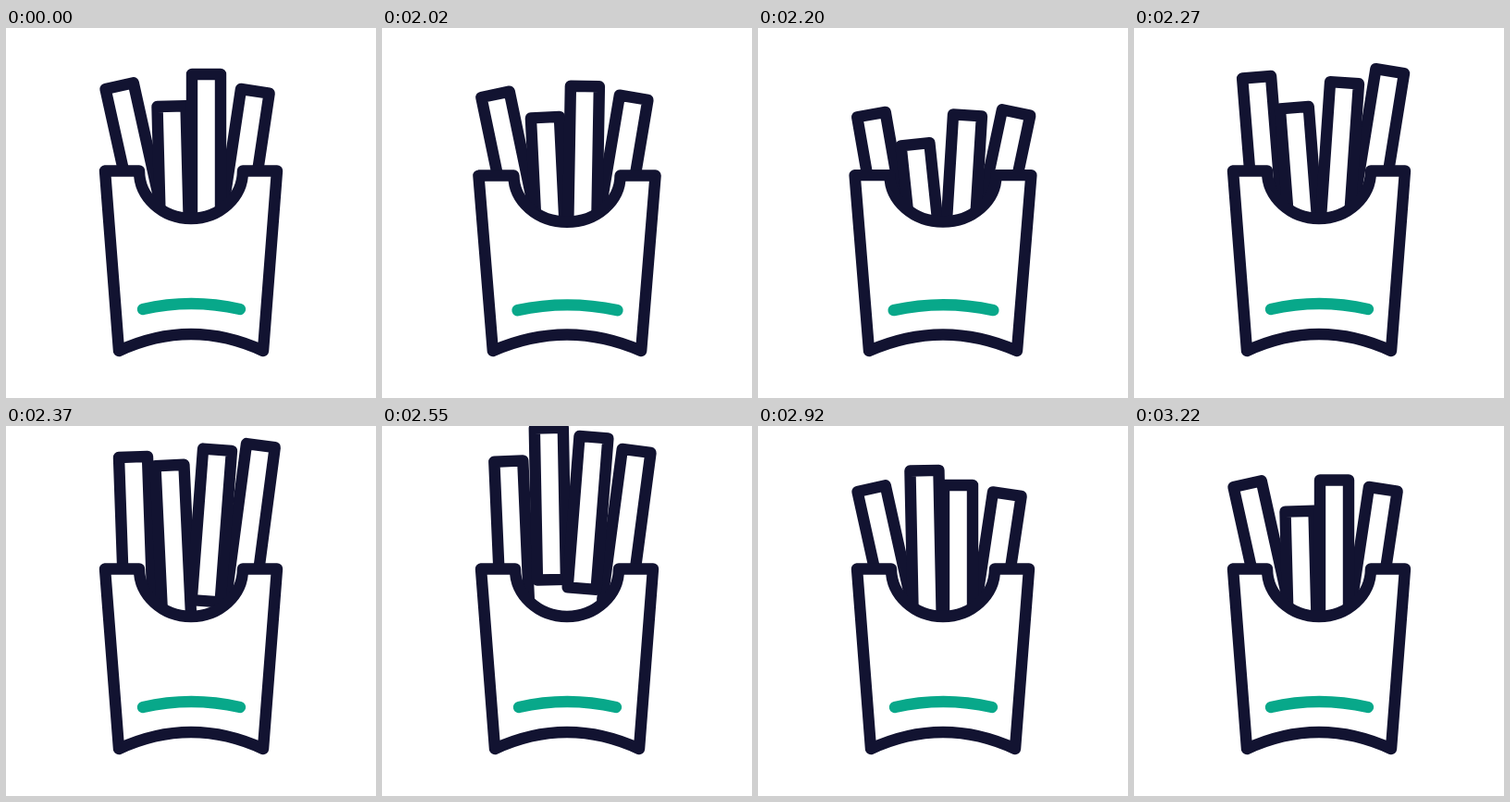
Write an HTML page that moves like this. It is 400 px wide and 400 px high and loops after 3250 ms.

```html
<!DOCTYPE html>
<html lang="en">
<head>
<meta charset="utf-8">
<title>French fries</title>
<style>
  html, body { margin: 0; height: 100%; overflow: hidden; background: #fff; }
  svg { display: block; width: 100%; height: 100%; }
  path, rect { fill: #fff; stroke: #121331; stroke-width: 12.4; stroke-linecap: round; stroke-linejoin: round; vector-effect: non-scaling-stroke; }
  .smile { fill: none; stroke: #08a88a; }
</style>
</head>
<body>
<svg viewBox="0 0 400 400">
  <g id="fries"></g>
  <g id="carton">
    <path d="M107 154.500H144A56 51.500 0 0 0 256 154.500H293L278 349Q200 313 122 349Z"/>
    <path class="smile" d="M148 304Q200 292 253 304"/>
  </g>
</svg>
<script>
const LOOP = 3250, START = 2020, LAUNCH = 2200, FALL = 400, BOUNCE = 300;

// Poses are the top left corner and the tilt in degrees.
// Each fry dips to low, flies to high at the time peak and drops back to rest, ending sag lower.
const fries = [
  { rest: [107.5, 66, -12.5], low: [107, 97, -10], high: [122, 34, -2], peak: 2365, sag: 0 },
  { rest: [254, 66, 8.5], low: [264, 89, 12], high: [260, 19, 7.5], peak: 2377, sag: 0 },
  { rest: [163.5, 85, -1.5], low: [154.5, 128, -6], high: [165, 0, -1], peak: 2608, sag: 4.5 },
  { rest: [201, 50, 0], low: [211, 94, 3.5], high: [213.5, 10.5, 4.5], peak: 2490, sag: 8.5 },
];

for (const fry of fries) {
  fry.node = document.createElementNS("http://www.w3.org/2000/svg", "rect");
  fry.node.setAttribute("width", 31);
  fry.node.setAttribute("height", 164);
  document.getElementById("fries").append(fry.node);
}

const mix = (a, b, k) => a + (b - a) * k;
const mixPose = (a, b, side, height = side) =>
  [mix(a[0], b[0], side), mix(a[1], b[1], height), mix(a[2], b[2], side)];

function pose({ rest, low, high, peak, sag }, t) {
  if (t < START) return rest;
  if (t < LAUNCH) return mixPose(rest, low, Math.sin(Math.PI / 2 * (t - 1980) / 220));
  if (t < peak) return mixPose(high, low, ((peak - t) / (peak - LAUNCH)) ** 2);

  const fall = Math.min((t - peak) / FALL, 1);
  const settle = Math.min(Math.max((t - peak - FALL) / BOUNCE, 0), 1);
  const landing = [rest[0], rest[1] + sag, rest[2]];
  const [x, y, tilt] = mixPose(high, landing, fall ** 4, fall ** 2.5);
  return [x, y + 6.5 * Math.sin(Math.PI * Math.sqrt(settle)), tilt];
}

function squash(t) {
  const u = (t - 1975) / 270;
  return t < START || u > 1 ? 0 : Math.sin(Math.PI * u) ** 2;
}

const carton = document.getElementById("carton");

function draw(now) {
  const t = now % LOOP;
  for (const fry of fries) {
    const [x, y, tilt] = pose(fry, t);
    fry.node.setAttribute("transform", `translate(${x} ${y}) rotate(${tilt})`);
  }
  const s = squash(t);
  carton.setAttribute("transform",
    `translate(200 349) scale(${1 + 0.107 * s} ${1 - 0.1 * s}) translate(-200 -349)`);
  requestAnimationFrame(draw);
}
draw(performance.now());
</script>
</body>
</html>
```
